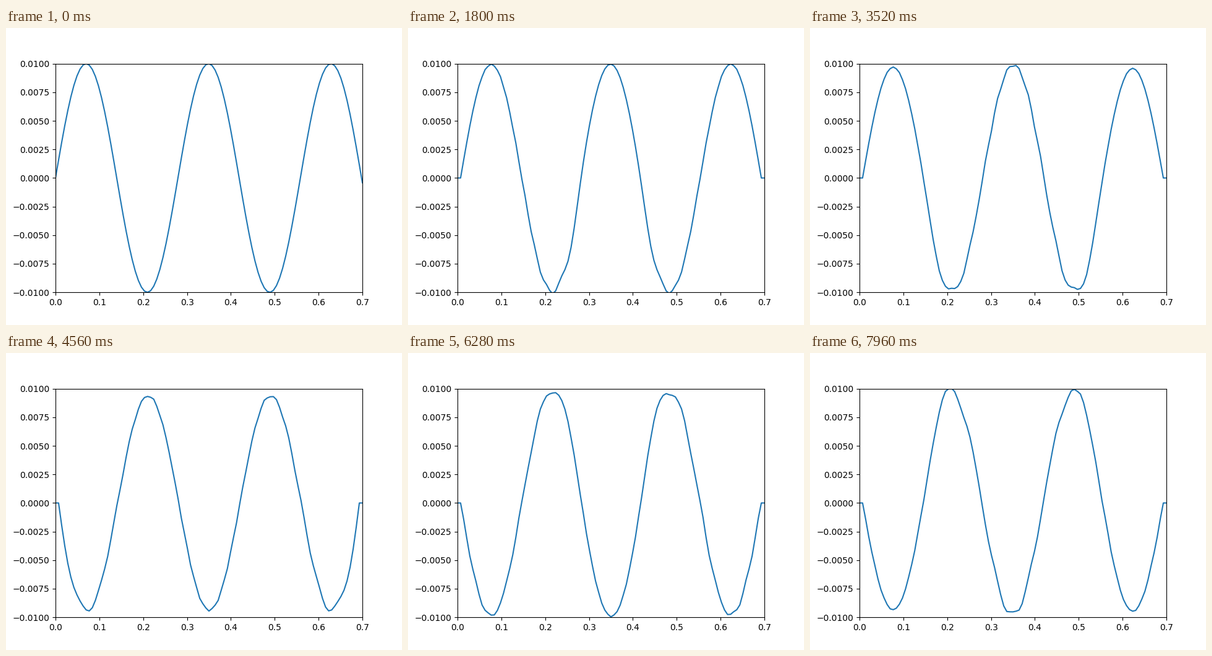
A matplotlib script for the animation above (8000 ms loop, 640 px wide and 480 px high).

```python
import numpy as np
import matplotlib.pyplot as plt
from matplotlib.animation import FuncAnimation

FRAMES, INTERVAL = 200, 40
LENGTH, NX = 0.7, 101
PITCH = 440
SPEED = 2 * LENGTH * PITCH
DX = LENGTH / (NX - 1)
DT = 1e-6
STEPS = 10          # time steps per frame
GAMMA = 2.6e-5      # damping


def simulate(start):
    """Damped wave equation by leapfrog; two points at each end are held at zero."""
    inertia = 1 / (SPEED * DT) ** 2
    drag = GAMMA / (2 * DT)
    prev, cur = start.copy(), start.copy()
    shots = [start]
    for n in range(2, FRAMES * STEPS):
        bend = (cur[1:-3] - 2 * cur[2:-2] + cur[3:-1]) / DX ** 2
        new = np.zeros(NX)
        new[2:-2] = (bend + 2 * inertia * cur[2:-2]
                     + (drag - inertia) * prev[2:-2]) / (inertia + drag)
        prev, cur = cur, new
        if n % STEPS == 0:
            shots.append(cur)
    return shots


x = np.linspace(0, LENGTH, NX)
shape = simulate(0.01 * np.sin(22.5 * x))

fig, ax = plt.subplots(figsize=(6.4, 4.8), dpi=100)
line, = ax.plot(x, shape[0], color="#1f77b4", lw=1.5)
ax.set_xlim(0, LENGTH)
ax.set_ylim(-0.01, 0.01)


def update(i):
    line.set_ydata(shape[i])
    return line,


anim = FuncAnimation(fig, update, frames=FRAMES, interval=INTERVAL,
                     repeat=True, repeat_delay=0)
plt.show()
```
